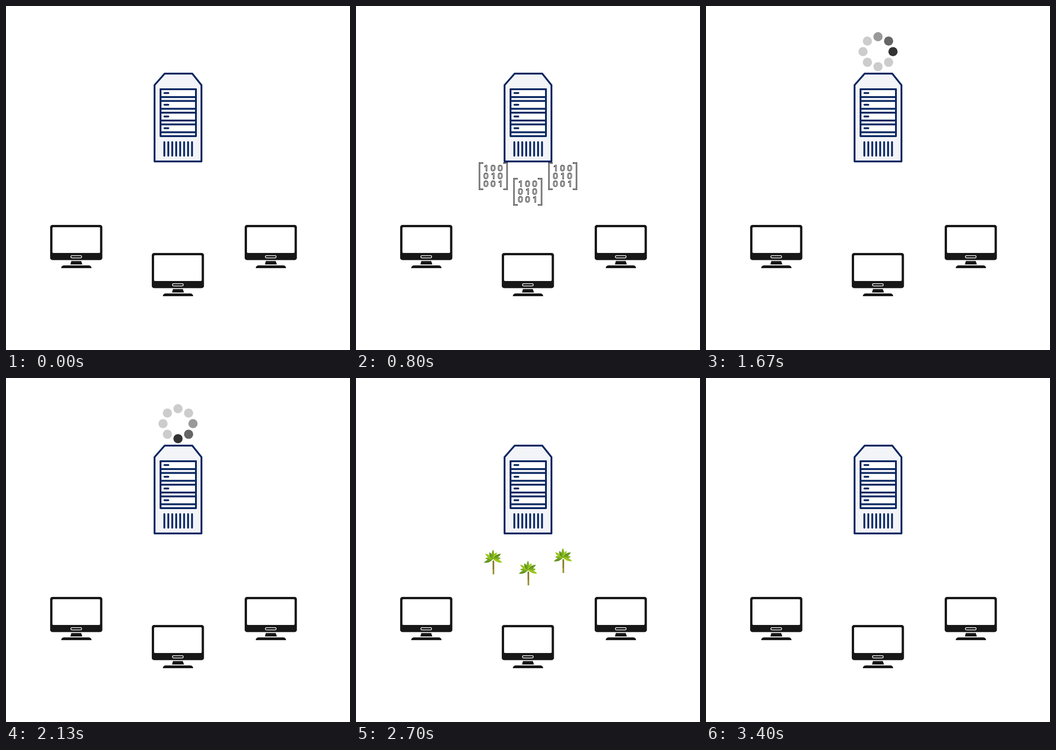
An HTML page with a canvas for the animation above (3510 ms loop, 748x748 px).

```html
<!DOCTYPE html>
<html lang="en">
<head>
<meta charset="utf-8">
<title>Clients and server</title>
<style>
html, body { margin: 0; width: 100%; height: 100%; overflow: hidden; background: #fff; }
canvas { display: block; width: 748px; height: 748px; }
</style>
</head>
<body>
<canvas id="stage" width="748" height="748"></canvas>
<script>
const ctx = document.getElementById('stage').getContext('2d');
const LOOP = 3510, NAVY = '#0a2862', INK = '#171717', PANEL = '#f3f4f8';

function trace(points) {
  ctx.beginPath();
  points.forEach(([x, y]) => ctx.lineTo(x, y));
}

function stroke(color, width) {
  ctx.strokeStyle = color;
  ctx.lineWidth = width;
  ctx.stroke();
}

function fill(color) {
  ctx.fillStyle = color;
  ctx.fill();
}

function line(x1, y1, x2, y2) {
  trace([[x1, y1], [x2, y2]]);
  stroke(NAVY, 4);
}

function box(x, y, w, h, r) {
  ctx.beginPath();
  ctx.roundRect(x, y, w, h, r);
}

function at(x, y, draw) {
  ctx.save();
  ctx.translate(Math.round(x), Math.round(y));
  draw();
  ctx.restore();
}

function server() {
  ctx.lineCap = ctx.lineJoin = 'round';
  trace([[323, 172], [345, 147], [405, 147], [425, 172], [425, 338], [323, 338]]);
  ctx.closePath();
  fill(PANEL);
  stroke(NAVY, 4);
  box(336, 181, 77, 102, 0);
  stroke(NAVY, 4);
  for (let i = 0; i < 4; i++) {
    const y = 181 + i * 25.5;
    box(338, y + 2, 73, 13, 0);
    fill('#fff');
    line(336, y, 413, y);
    line(336, y + 17, 413, y + 17);
    line(344.5, y + 8.3, 353, y + 8.3);
  }
  for (let i = 0; i < 8; i++) line(344.3 + i * 8.6, 296, 344.3 + i * 8.6, 325.5);
}

function monitor() {
  box(0, 0, 113.5, 76.5, 5);
  fill(INK);
  box(5, 5, 103.5, 56, 2);
  fill('#fff');
  box(45, 66.7, 23.5, 5, 2.5);
  stroke('#fff', 1.4);
  trace([[46, 78.5], [67.5, 78.5], [70, 86], [44, 86]]);
  fill(INK);
  box(24, 88, 66, 6, [7, 7, 0, 0]);
  fill(INK);
}

function matrix() {
  ctx.lineJoin = 'miter';
  ctx.lineCap = 'square';
  for (const [edge, tip] of [[1.5, 8], [61.5, 55]]) {
    trace([[tip, 1.5], [edge, 1.5], [edge, 58.5], [tip, 58.5]]);
    stroke('#111', 3);
    stroke('#fff', 1);
  }
  ctx.font = '600 17px Inter, sans-serif';
  ctx.textAlign = 'center';
  ctx.lineJoin = 'round';
  ctx.lineWidth = 0.9;
  ctx.strokeStyle = '#000';
  for (let i = 0; i < 9; i++) {
    const row = Math.floor(i / 3), col = i % 3;
    ctx.strokeText(row === col ? '1' : '0', 15.5 + col * 15.6, 19.3 + row * 17);
  }
}

// A fan of pointed leaves, alternating long and short, on a thin trunk
function tree() {
  box(20, 23, 3.5, 30, 1);
  fill('#8a7a26');
  box(20.5, 42, 1.5, 11, 0);
  fill('#b5ac3c');
  for (let i = 0; i < 9; i++) {
    const angle = (200 - i * 27.5) * Math.PI / 180;
    const reach = i % 2 ? 17 : 21;
    ctx.save();
    ctx.translate(21, 20);
    ctx.rotate(-angle);
    ctx.beginPath();
    ctx.moveTo(0, 0);
    ctx.quadraticCurveTo(reach * 0.6, -6, reach, 0);
    ctx.quadraticCurveTo(reach * 0.6, 5, 0, 0);
    fill(`hsl(${88 - i % 3 * 7}, 75%, ${30 + i % 3 * 7}%)`);
    trace([[2, 0], [reach - 3, 0]]);
    stroke('#a0d035', 0.8);
    ctx.restore();
  }
}

function spinner(head) {
  const shades = ['#333', '#666', '#999'];
  for (let i = 0; i < 8; i++) {
    const a = i * Math.PI / 4;
    ctx.beginPath();
    ctx.arc(374 + 32.6 * Math.sin(a), 99.3 - 32.6 * Math.cos(a), 10, 0, 7);
    fill(shades[(head - i + 8) % 8] || '#ccc');
  }
}

// Each route runs from one point to another
const UPLOAD = [[173, 463, 294, 305], [342, 488, 342, 342], [480.5, 463, 400, 305]];
const DOWNLOAD = [[323, 336, 190, 446], [353, 351, 353, 487], [392.6, 332, 498, 445]];

function travel(routes, p, draw) {
  for (const [x0, y0, x1, y1] of routes) at(x0 + (x1 - x0) * p, y0 + (y1 - y0) * p, draw);
}

function render(t) {
  const step = Math.floor(t / 100) * 100;
  ctx.fillStyle = '#fff';
  ctx.fillRect(0, 0, 748, 748);
  server();
  at(96, 476, monitor);
  at(317, 537, monitor);
  at(519, 476, monitor);
  if (t >= 100 && t < 1200) {
    travel(UPLOAD, ((step - 100) / 1000) ** 0.7, matrix);
  } else if (t >= 1200 && t < 2200) {
    spinner([1400, 1670, 1900, 2130].filter(turn => turn <= t).length);
  } else if (t >= 2200 && t < 3400) {
    travel(DOWNLOAD, ((step - 2200) / 1100) ** 1.35, tree);
  }
}

const start = performance.now();
function tick() {
  render((performance.now() - start) % LOOP);
  requestAnimationFrame(tick);
}
tick();
</script>
</body>
</html>
```
